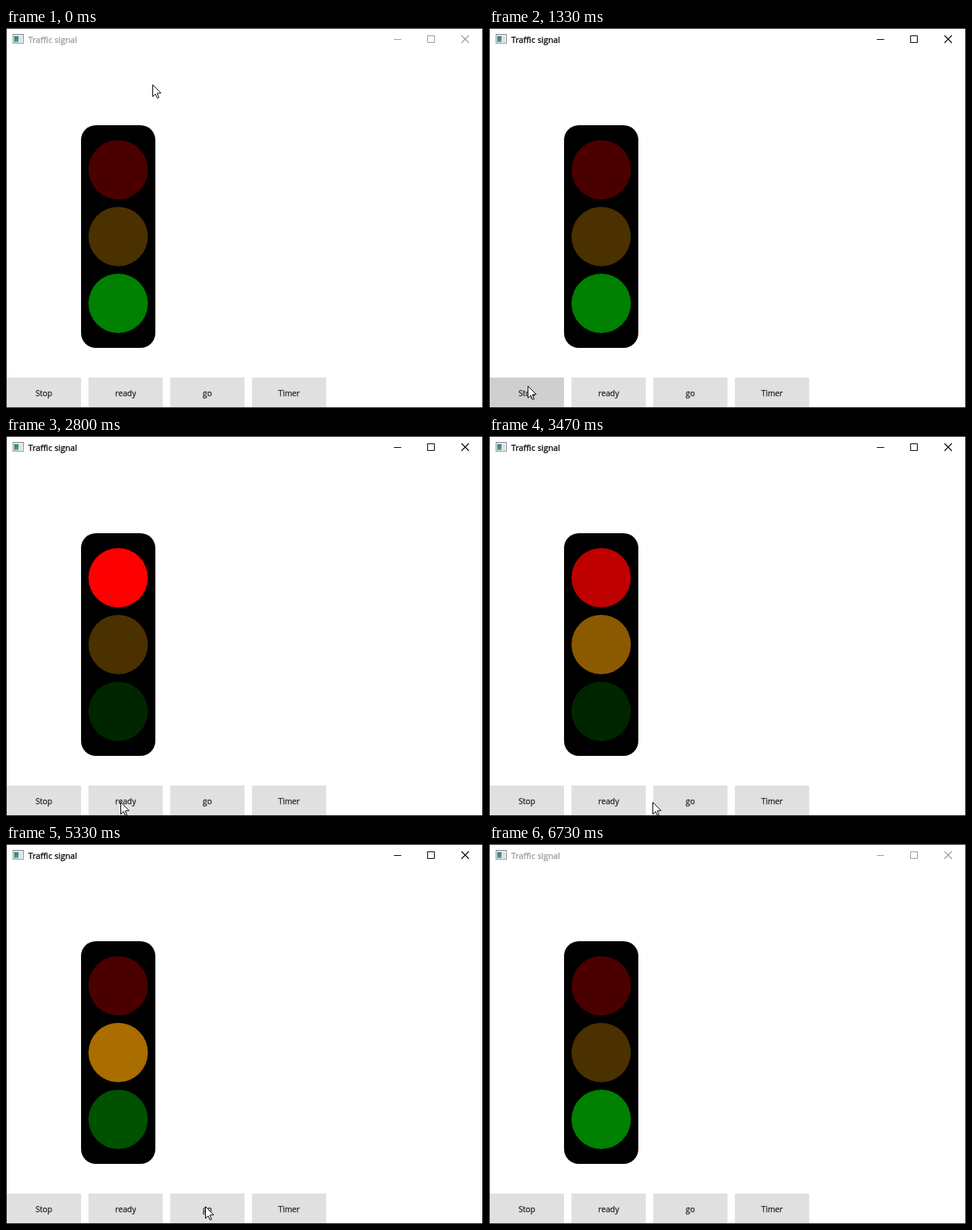
Write an HTML page with a canvas that moves like this. It is 642 px wide and 512 px high and loops after 6870 ms.

```html
<!DOCTYPE html>
<html lang="en">
<head>
<meta charset="utf-8">
<title>Traffic signal</title>
<style>
  html, body { margin: 0; width: 100%; height: 100%; overflow: hidden; background: #fff; }
  canvas { display: block; width: 642px; height: 512px; }
</style>
</head>
<body>
<canvas id="stage" width="642" height="512"></canvas>
<script>
const ctx = document.getElementById('stage').getContext('2d');
const LOOP = 6870;
const TICK = 200 / 3; // the picture refreshes 15 times a second
const FADE = 1000;
const ACTIVE = { from: 1270, to: 6730 };

// The first three buttons are pressed in turn, and each release starts a fade
const BUTTONS = [
  { label: 'Stop', from: 1330, to: 1465 },
  { label: 'ready', from: 3000, to: 3112 },
  { label: 'go', from: 4800, to: 4850 },
  { label: 'Timer' }
];

// Pointer moves; bend is the control point of a curved one
const START = [197, 76];
const MOVES = [
  { from: 0, to: 870, end: [48, 480], bend: [-78, 480] },
  { from: 1070, to: 1200, end: [52, 482] },
  { from: 1800, to: 2530, end: [152, 485], bend: [155, 471] },
  { from: 2530, to: 2800, end: [154, 493] },
  { from: 3130, to: 3870, end: [258, 489], bend: [243, 494] },
  { from: 4370, to: 4530, end: [268, 488] },
  { from: 6000, to: 6130, end: [240, 520] }
];

const ARROW = new Path2D('M0 0V16L3.6 12.5L6.2 18L8.3 17.2L5.9 11.5L11 11.2Z');

const within = (t, span) => t >= span.from && t < span.to;
const progress = (t, from, to) => Math.min(1, Math.max(0, (t - from) / (to - from)));
const mix = (a, b, u) => a + (b - a) * u;
const mixAll = (a, b, u) => a.map((v, i) => mix(v, b[i], u));

function rect(x, y, w, h, color) {
  ctx.fillStyle = color;
  ctx.fillRect(x, y, w, h);
}

// A hairline outline gives small text its crisp, dark look
function text(str, x, y, size, color, align) {
  ctx.font = `${size}px "Open Sans", "Noto Sans", sans-serif`;
  ctx.textAlign = align;
  ctx.fillStyle = ctx.strokeStyle = color;
  ctx.lineWidth = 0.3;
  ctx.fillText(str, x, y);
  ctx.strokeText(str, x, y);
}

function drawIcon() {
  rect(9, 8, 15, 13, '#8b9093');
  rect(10, 9, 13, 1, '#c9d0d3');
  rect(10, 10, 13, 10, '#f4f6f6');
  const teal = ctx.createLinearGradient(11, 11, 16, 19);
  teal.addColorStop(0, '#31748a');
  teal.addColorStop(1, '#5da58d');
  rect(11, 11, 6, 8, teal);
  rect(18, 11, 4, 8, '#dde1e3');
}

function drawTitleBar(active) {
  const color = active ? '#000' : '#999';
  drawIcon();
  text('Traffic signal', 30, 20, 11.3, color, 'left');
  rect(522, 15, 10, 1, color);
  ctx.strokeStyle = color;
  ctx.lineWidth = 1;
  ctx.strokeRect(567.5, 10.5, 9, 9);
  ctx.lineWidth = 1.2;
  ctx.stroke(new Path2D('M613 10l10 10m0 -10l-10 10'));
}

function lamp(row, off, on, level) {
  ctx.fillStyle = `rgb(${mixAll(off, on, level).map(Math.round)})`;
  ctx.beginPath();
  ctx.arc(151, 191 + row * 90, 40, 0, Math.PI * 2);
  ctx.fill();
}

function drawSignal(t) {
  const [stop, ready, go] = BUTTONS.slice(0, 3).map(b => progress(t, b.to, b.to + FADE));
  ctx.fillStyle = '#000';
  ctx.beginPath();
  ctx.roundRect(101, 131, 100, 300, 20);
  ctx.fill();
  lamp(0, [75, 0, 0], [255, 0, 0], stop - ready);
  lamp(1, [75, 48, 0], [255, 165, 0], ready - go);
  lamp(2, [0, 38, 0], [0, 128, 0], 1 - stop + go);
}

function drawButton(button, i, t) {
  const x = 1 + i * 110;
  rect(x, 471, 100, 40, within(t, button) ? '#cfcfcf' : '#e0e0e0');
  text(button.label, x + 50, 495.5, 10.7, '#26282a', 'center');
}

function cursorAt(t) {
  let pos = START;
  for (const { from, to, end, bend } of MOVES) {
    const u = progress(t, from, to);
    const mid = bend || mixAll(pos, end, 0.5);
    pos = mixAll(mixAll(pos, mid, u), mixAll(mid, end, u), u);
    if (u < 1) break;
  }
  return pos.map(Math.round);
}

function drawCursor(t) {
  const [x, y] = cursorAt(t);
  ctx.save();
  ctx.translate(x + 0.5, y + 0.5);
  ctx.fillStyle = '#fff';
  ctx.strokeStyle = '#000';
  ctx.lineWidth = 1;
  ctx.fill(ARROW);
  ctx.stroke(ARROW);
  ctx.restore();
}

// Start of the refresh that is on screen, on a 10 ms clock
function snap(t) {
  const start = k => Math.round(k * TICK / 10) * 10;
  const k = Math.floor((t + 5) / TICK);
  return start(k) > t ? start(k - 1) : start(k);
}

function draw() {
  const t = snap(performance.now() % LOOP);
  const active = within(t, ACTIVE);
  rect(0, 0, 642, 512, '#fff');
  drawTitleBar(active);
  drawSignal(t);
  BUTTONS.forEach((b, i) => drawButton(b, i, t));
  drawCursor(t);
  ctx.strokeStyle = active ? '#181818' : '#2b2b2b';
  ctx.lineWidth = 1;
  ctx.strokeRect(0.5, 0.5, 641, 511);
  requestAnimationFrame(draw);
}

draw();
</script>
</body>
</html>
```
